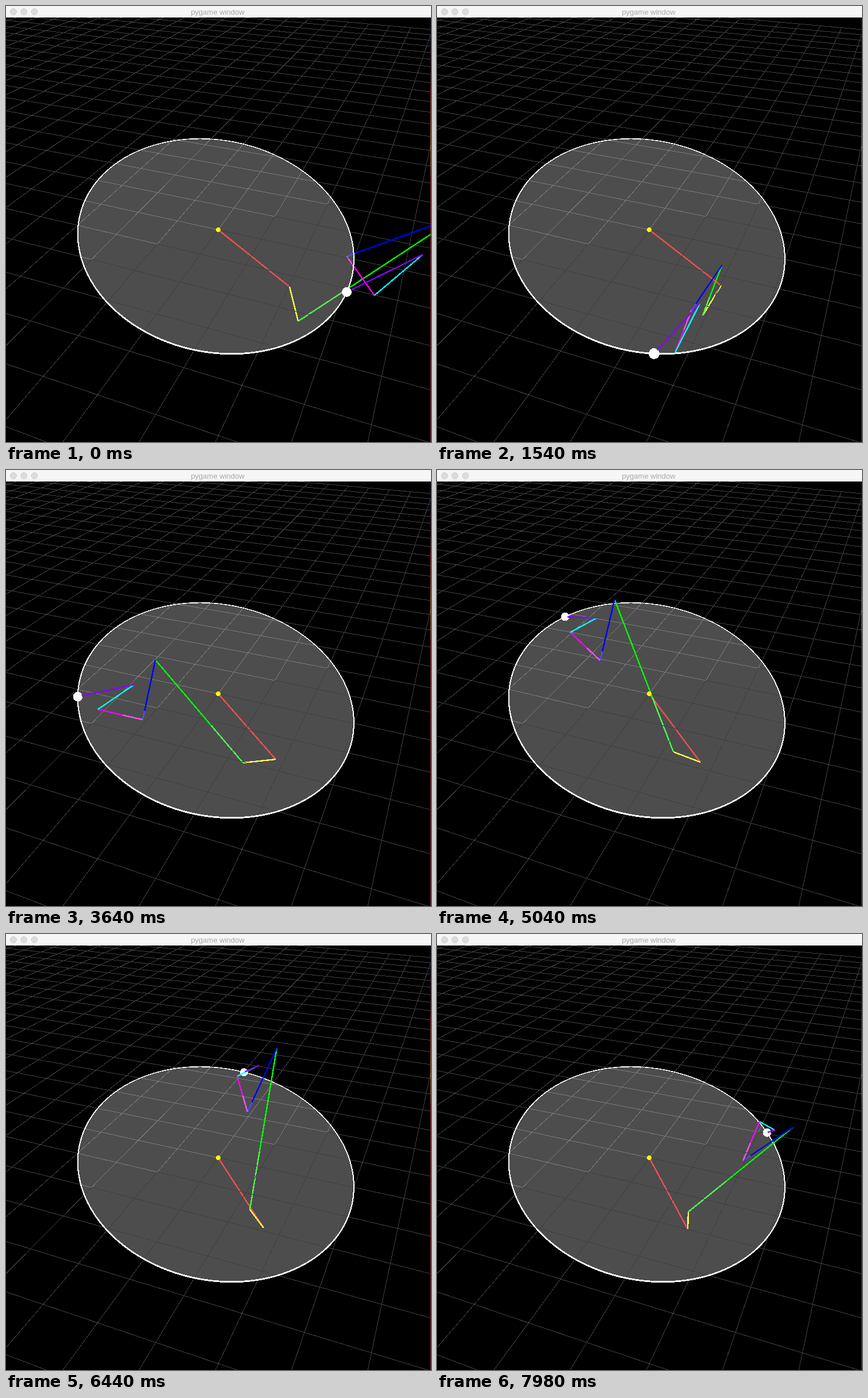
Animation, 739 px wide and 758 px high, one loop 8 s. Source, as an HTML page:

```html
<!DOCTYPE html>
<html lang="en">
<head>
<meta charset="utf-8">
<title>pygame window</title>
<style>
  html, body { margin: 0; width: 100%; height: 100%; overflow: hidden; background: #000; }
  svg { display: block; }
  .crisp { shape-rendering: crispEdges; fill: none; }
  text { font: 13px "Liberation Sans", Arial, sans-serif; fill: #a8a8a8; text-anchor: middle; }
</style>
</head>
<body>
<svg id="stage" width="739" height="758" viewBox="0 0 739 758"></svg>
<script>
const CENTER = [369, 389];
const RAD = Math.PI / 180;

// Camera: pitch and yaw around the origin, scale in px per grid unit at the origin
const SCALE = 78.5, FOCAL = 997, DIST = FOCAL / SCALE;
const PITCH = 33.1 * RAD, YAW = 21.78 * RAD;

// Half axes of the tilted disc: x, y and depth; the first lies on the ground
const AXIS_A = [218, -51.1, 0.0773], AXIS_B = [-93.1, -175.2, 0.1375];

// Ground point in grid units to the screen
function project(u, v) {
  const right = u * Math.cos(YAW) + v * Math.sin(YAW);
  const ahead = v * Math.cos(YAW) - u * Math.sin(YAW);
  const k = SCALE / (1 + ahead * Math.cos(PITCH) / DIST);
  return [CENTER[0] + right * k, CENTER[1] - ahead * Math.sin(PITCH) * k];
}

function rim(angle) {
  const [x, y, z] = AXIS_A.map((a, i) => a * Math.cos(angle) + AXIS_B[i] * Math.sin(angle));
  return [CENTER[0] + x / (1 + z), CENTER[1] + y / (1 + z), 1 + z];
}

const RIM = Array.from({ length: 181 }, (_, i) => rim(i * 2 * RAD));

// Poses of the arm: x and y of each joint at the key ticks.
const KEYS = [0, 22, 40, 52, 72, 92, 112];
const FIXED_JOINTS = [
  [[493, 494, 478, 469, 458, 448, 436], [488, 486, 497, 503, 508, 511, 513]],
  [[508, 462, 424, 412, 411, 424, 437], [548, 538, 522, 509, 490, 479, 483]]
];
// These are offsets from the ball
const BALL_JOINTS = [
  [[196, 118, 146, 135, 86, 57, 46], [-133, -154, -111, -64, -30, -42, -10]],
  [[0, 65, 118, 113, 61, 6, -42], [-62, -75, -7, 40, 76, 69, 49]],
  [[48, 36, 40, 35, 9, -12, -13], [6, -1, 8, 22, 27, 7, -19]],
  [[132, 80, 108, 98, 55, 26, 14], [-65, -88, -58, -21, 2, -12, -4]]
];

// Tangent at key i, from the parabola through its neighbours
function tangent(values, i) {
  const m = Math.min(Math.max(i, 1), KEYS.length - 2);
  const h0 = KEYS[m] - KEYS[m - 1], h1 = KEYS[m + 1] - KEYS[m];
  const s0 = (values[m] - values[m - 1]) / h0, s1 = (values[m + 1] - values[m]) / h1;
  const bend = (s1 - s0) / (h0 + h1);
  return s0 + bend * h0 + 2 * bend * (KEYS[i] - KEYS[m]);
}

function curve(values, tick) {
  let i = 0;
  while (i < KEYS.length - 2 && tick >= KEYS[i + 1]) i++;
  const h = KEYS[i + 1] - KEYS[i], p = (tick - KEYS[i]) / h, q = 1 - p;
  return values[i] * q * q * (1 + 2 * p) + values[i + 1] * p * p * (3 - 2 * p)
    + h * p * q * (tangent(values, i) * q - tangent(values, i + 1) * p);
}

const mix = (a, b, k) => [a[0] + (b[0] - a[0]) * k, a[1] + (b[1] - a[1]) * k];
const path = points => 'M' + points.map(p => p[0].toFixed(2) + ' ' + p[1].toFixed(2)).join('L');
const line = (a, b, color, width) =>
  `<path d="${path([a, b])}" stroke="${color}" stroke-width="${width}"/>`;

function gridPath() {
  let d = '';
  for (let i = -20; i <= 20; i++) {
    if (i <= 14) d += path([project(i, -7), project(i, 20)]);
    if (i >= -7) d += path([project(-20, i), project(14, i)]);
  }
  return d;
}

function rimLines() {
  return RIM.slice(1).map((p, i) => line(RIM[i], p, '#fff', (2 / p[2] ** 2).toFixed(2))).join('');
}

// Colour of each link and the part of it that lies below the disc
const LINKS = [
  ['#f00', 0, 1], ['#ff0', 0, 1], ['#0f0', 0, 0.36], ['#00f', 0.85, 1],
  ['#f0f', 0, 0.45], ['#0ff', 0, 0], ['#80f', 0, 0]
];

function armLines(joints, below) {
  return LINKS.map(([color, from, to], i) => {
    const a = joints[i], b = joints[i + 1];
    const parts = below ? [[from, to]] : [[0, from], [to, 1]];
    return parts.filter(([p, q]) => q > p)
      .map(([p, q]) => line(mix(a, b, p), mix(a, b, q), color, 2.4)).join('');
  }).join('');
}

const GRID = `<path d="${gridPath()}" stroke="#404040"/>`;
const DISC = path(RIM) + 'Z';
// The half of the disc that dips below the ground
const NEAR = path(RIM.slice(90)) + 'Z';

document.getElementById('stage').innerHTML = `
  <defs>
    <clipPath id="near"><path d="${NEAR}"/></clipPath>
    <linearGradient id="edge" x2="0" y2="1">
      <stop offset="0.03" stop-color="#181428"/><stop offset="0.15" stop-color="#301828"/>
      <stop offset="0.2" stop-color="#902030"/><stop offset="0.3" stop-color="#a06028"/>
      <stop offset="0.36" stop-color="#a06028"/><stop offset="0.4" stop-color="#902030"/>
      <stop offset="1" stop-color="#802030"/>
    </linearGradient>
  </defs>
  <g class="crisp">
    ${GRID}
    <path d="${NEAR}" fill="#000"/>
    <g id="below"></g>
    <path d="${DISC}" fill="#fff" fill-opacity="0.3"/>
    <g clip-path="url(#near)">${GRID}</g>
    <g stroke-linecap="round">${rimLines()}</g>
    <circle id="ball" fill="#fff"/>
    <g id="above"></g>
    <circle cx="${CENTER[0]}" cy="${CENTER[1]}" r="4" fill="#ff0"/>
  </g>
  <rect x="738" width="1" height="758" fill="url(#edge)"/>
  <rect width="739" height="20" fill="#f6f6f6"/>
  <g fill="#dcdcdc" stroke="#cfcfcf">
    ${[13, 31, 49.5].map(x => `<circle cx="${x}" cy="10" r="5.5"/>`).join('')}
  </g>
  <text x="368" y="15">pygame window</text>`;

const [below, above, ballDot] = ['below', 'above', 'ball'].map(id => document.getElementById(id));

function draw(ms) {
  const step = Math.floor(ms / 70);
  // Two steps repeat the picture before them
  const tick = step - (step >= 94) - (step >= 106);
  const ball = rim((-50.3 - 2.777 * tick) * RAD);
  const at = (joint, base) => joint.map((values, axis) => base[axis] + curve(values, tick));
  const joints = [
    CENTER,
    ...FIXED_JOINTS.map(j => at(j, [0, 0])),
    ...BALL_JOINTS.map(j => at(j, ball))
  ];
  joints.push(mix(joints[6], ball, 0.93));

  below.innerHTML = armLines(joints, true);
  above.innerHTML = armLines(joints, false);
  ballDot.setAttribute('cx', ball[0]);
  ballDot.setAttribute('cy', ball[1]);
  ballDot.setAttribute('r', 8 / ball[2]);
}

function frame() {
  draw(performance.now() % 8000);
  requestAnimationFrame(frame);
}
frame();
</script>
</body>
</html>
```
